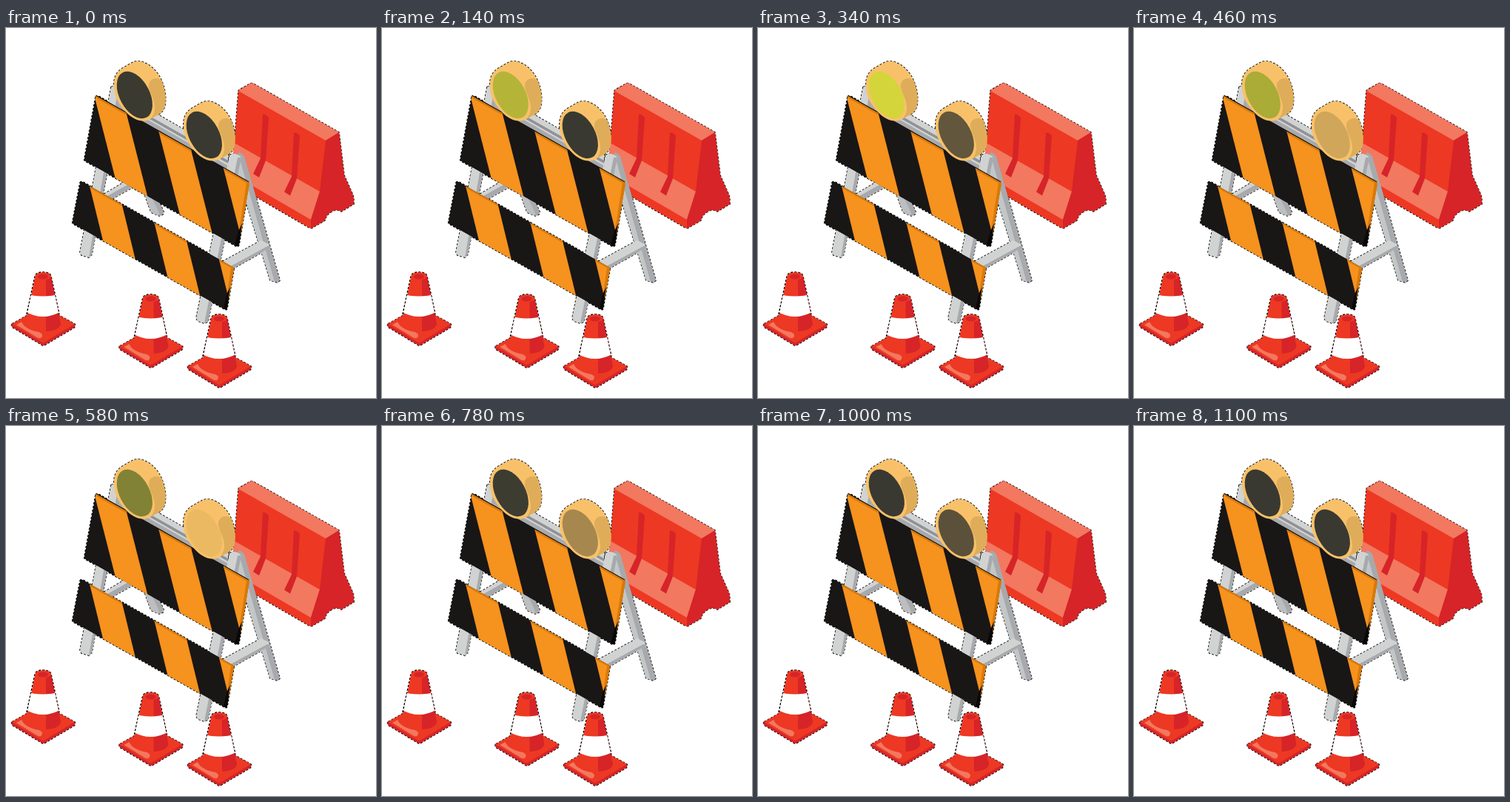
An HTML page with a canvas that plays this animation: 500x500 px, repeating every 1200 ms.

```html
<!DOCTYPE html>
<html lang="en">
<head>
<meta charset="utf-8">
<title>Road works</title>
<style>
  html, body { margin: 0; width: 100%; height: 100%; overflow: hidden; background: #fff; }
  canvas { display: block; width: 100vw; height: 100vh; object-fit: contain; }
</style>
</head>
<body>
<canvas id="stage" width="500" height="500"></canvas>
<script>
const ctx = document.getElementById('stage').getContext('2d');
const LOOP = 1200;

const RED = '#ed3823', DARK_RED = '#d62428', PINK = '#f2785f';
const ORANGE = '#f6921e', RUST = '#d97908', BLACK = '#191616';
const SILVER = '#d0d3d2', GREY = '#a7a9ac', STEEL = '#8f9194';
const AMBER = '#f8c169', SHADE = '#dfad59';
const OFF = [57, 57, 49], YELLOW = [214, 215, 58], GOLD = [235, 185, 98];

function fill(d, color) {
  ctx.fillStyle = color;
  ctx.fill(new Path2D(d));
}

// Broken hairline, visible only where the silhouette meets the background
function edge(d) {
  ctx.save();
  ctx.globalCompositeOperation = 'destination-over';
  ctx.lineWidth = 1.6;
  ctx.strokeStyle = '#000';
  ctx.setLineDash([3, 2]);
  ctx.stroke(new Path2D(d));
  ctx.restore();
}

function solid(d, color) {
  fill(d, color);
  edge(d);
}

function ellipse(x, y, rx, ry, color, turn = 0) {
  ctx.fillStyle = color;
  ctx.beginPath();
  ctx.ellipse(x, y, rx, ry, turn, 0, Math.PI * 2);
  ctx.fill();
}

function at(x, y, draw) {
  ctx.save();
  ctx.translate(x, y);
  draw();
  ctx.restore();
}

function barrier() {
  const body = 'M314 86Q314 84 316 83L330 75Q332 74 334 75L450 141L457 199L469 226Q470 228 470 238L453 248Q447 244 440 248Q432 253 431 260L414 270Q412 271 410 270L305 209L309 150Z';
  solid(body, RED);
  fill('M308 155L424 221L412 259L305 197Z', PINK);
  fill('M314 85L332 74L450 141L432 152Z', PINK);
  fill('M432 152L450 141L457 199L469 226Q470 228 470 238L453 248Q447 244 440 248Q432 253 431 260L412 271V259L424 221Z', DARK_RED);
  const slot = 'M347 117Q350 116 355 121L351 179L342 202L334 197L344 176Z';
  fill(slot, DARK_RED);
  at(42, 24.5, () => fill(slot, DARK_RED));
}

function frame() {
  // Rear legs and braces
  solid('M180 205L198 215L213 248L212 252L207 254L196 249Z', GREY);
  fill('M180 205L188 210L207 250L206 254L196 249Z', '#bcbec0');
  solid('M128 227L162 207L174 214L134 236Z', SILVER);
  fill('M130 231L169 209L174 213L135 236Z', GREY);
  solid('M306 176L316 168L322 173L370 341L367 344L357 341Z', GREY);
  fill('M306 176L315 174L363 343L357 341Z', '#c3c6c7');
  solid('M288 318L345 287L355 292L355 298L300 329Z', SILVER);
  fill('M296 326L353 295L355 295L355 298L300 329Z', GREY);

  // Top rail
  solid('M150 88L200 114L300 171L300 192L150 107Z', SILVER);
  fill('M150 94L300 179L300 183L150 98Z', STEEL);
  fill('M150 100L300 186L300 192L150 107Z', GREY);

  // Front legs
  solid('M142 80Q146 77 155 84L156 92L116 306L112 310L102 307L100 303Z', SILVER);
  fill('M151 86L156 92L116 306L112 310Z', GREY);
  solid('M302 172Q310 167 318 175L273 397L268 399L259 396L257 392Z', SILVER);
  fill('M313 175L318 175L273 397L268 399Z', GREY);
}

// Slanted stripes continue the two-tone pattern across a clipped panel
function board(outline, face, x, y, slantX, slantY, rim) {
  ctx.save();
  ctx.clip(new Path2D(outline));
  fill(outline, BLACK);
  for (let i = 0; i < 3; i++) {
    const sx = x + i * 87.4, sy = y + i * 49.4;
    fill(`M${sx} ${sy}l43.6 24.6l${slantX} ${slantY}l-43.6 -24.6Z`, ORANGE);
    fill(`M${sx} ${sy}l43.6 24.6l.8 3l-43.6 -24.6Z`, RUST);
  }
  fill(rim, RUST);
  fill(face, '#090807');
  ctx.restore();
  edge(outline);
}

function boards() {
  board('M121 93Q122 91 125 92L328 207Q329 208 329 210L315 293Q314 296 311 295L107 180Q105 179 106 176Z',
    'M319 264L315 296L309 294L314 275Z', 119, 90.5, 29, 114, 'M325 209L330 207L319 267L315 274Z');
  board('M100 209Q101 207 104 208L307 323Q308 324 308 326L299 379Q298 382 295 380L91 265Q89 264 90 261Z',
    'M303 350L298 382L294 379L299 358Z', 113, 213.5, 18.3, 75, 'M304 325L309 323L303 354L299 359Z');
}

function lamp(lens) {
  const tilt = 62 * Math.PI / 180;
  const body = 'M146 82C145 68 148 60 158 54L172 46C183 42 197 50 206 63C214 76 217 91 215 103C214 110 211 114 206 117L193 124C182 129 168 122 158 109C150 99 147 91 146 82Z';
  solid(body, AMBER);
  ctx.save();
  ctx.clip(new Path2D(body));
  fill('M193 80C192 73 197 67 205 68L220 75L217 118L192 127C201 118 203 109 199 97C197 91 194 86 193 80Z', SHADE);
  ctx.restore();
  ellipse(173.8, 90.5, 34.4, 20.3, lens, tilt);
}

function cone() {
  const base = 'M8 400Q7 401 8 404L48 428Q50 430 53 428L92 405Q94 403 93 400L53 378Q50 376 47 378Z';
  solid(base, DARK_RED);
  fill('M8 400L47 378Q50 376 53 378L93 400L53 424Q50 426 47 424Z', RED);
  fill('M14 401L21 397Q25 407 45 411Q52 414 47 419Q44 420 40 417Z', PINK);

  const body = 'M39 336Q40 330 50 330Q60 330 61 336L74 400Q72 410 50 410Q28 410 26 400Z';
  ctx.save();
  ctx.clip(new Path2D(body));
  fill(body, RED);
  fill('M54 330H76V412H54Z', DARK_RED);
  fill('M24 358Q50 367 76 358V382Q50 398 24 382Z', '#fff');
  ctx.restore();
  edge('M28 387L39 336Q40 330 50 330Q60 330 61 336L72 387');
  ellipse(50, 335.5, 10.8, 5, RED);
  ellipse(50, 336, 7, 3.4, DARK_RED);
}

// Fades up from a to b, holds until c, fades out by d
function glow(t, a, b, c, d) {
  return Math.max(0, Math.min(1, (t - a) / (b - a), (d - t) / (d - c)));
}

function mix(from, to, k) {
  return `rgb(${from.map((v, i) => Math.round(v + (to[i] - v) * k))})`;
}

function render(now) {
  const t = now % LOOP;
  ctx.clearRect(0, 0, 500, 500);
  barrier();
  frame();
  boards();
  lamp(mix(OFF, YELLOW, glow(t, 0, 180, 335, 790)));
  at(94, 54, () => lamp(mix(OFF, GOLD, glow(t, 297, 490, 580, 1100))));
  cone();
  at(145.5, 30, cone);
  at(238, 57, cone);
}

const start = performance.now();
function tick() {
  render(performance.now() - start);
  requestAnimationFrame(tick);
}
tick();
</script>
</body>
</html>
```
